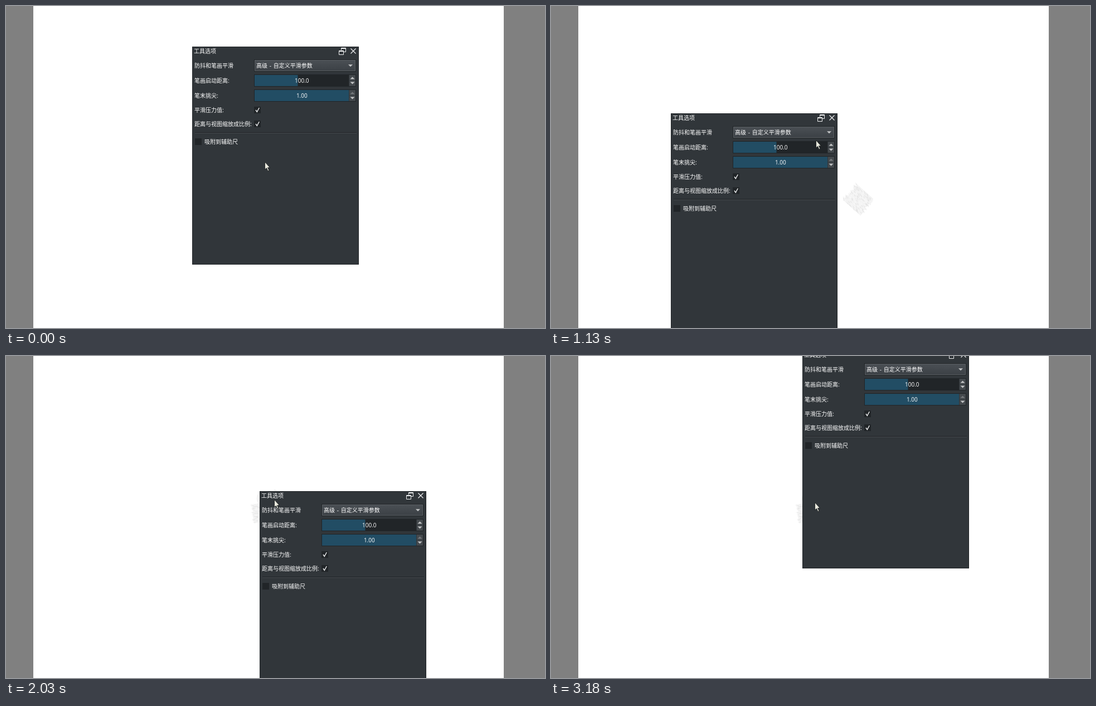
An HTML page with a canvas for the animation above (3.64 s loop, 967 by 579 pixels).

```html
<!DOCTYPE html>
<html lang="zh-CN">
<head>
<meta charset="utf-8">
<title>Tool options</title>
<style>
  html, body { margin: 0; width: 100%; height: 100%; overflow: hidden; background: #808080; }
  canvas, svg { position: absolute; left: 0; top: 0; display: block; }
  text {
    font: 10px "Open Sans", "Noto Sans CJK SC", "Noto Sans CJK", "Noto Sans", sans-serif;
    word-spacing: 1.2px;
    fill: #fff;
  }
</style>
</head>
<body>
<canvas id="paper" width="967" height="579"></canvas>
<svg id="stage" width="967" height="579" viewBox="0 0 967 579">
  <defs>
    <linearGradient id="raised" x1="0" y1="0" x2="0" y2="1">
      <stop offset="0" stop-color="#4b5055"/>
      <stop offset="1" stop-color="#3b4045"/>
    </linearGradient>
  </defs>
  <path id="wisp" d="M454 247Q447 256 454 265" fill="none" stroke="#000" stroke-opacity=".06" stroke-width="1.5"/>
  <g id="panel"></g>
  <g id="brush" fill="none" stroke="#000">
    <ellipse rx="31" ry="18"/>
    <circle r="2"/>
  </g>
  <path id="arrow" d="M.5 .5V14L3.5 11.3L5.9 16.7L7.9 15.8L5.6 10.6H9.5Z" fill="#ebebdf" stroke="#15181a" stroke-width=".8"/>
</svg>
<script>
const LOOP = 3640, STEP = 40;
const $ = id => document.getElementById(id);

// Panel parts, relative to its top left corner
const DARK = '#212528', EDGE = '#202427', LIGHT = '#eff0f1', DIM = '#75797c', MID = '#c4c6c7';

const box = (x, y, w, h, fill) =>
  `<rect x="${x}" y="${y}" width="${w}" height="${h}" fill="${fill}"/>`;
const frame = (x, y, w, h, color = EDGE) =>
  `<rect x="${x + .5}" y="${y + .5}" width="${w - 1}" height="${h - 1}" fill="none" stroke="${color}"/>`;
const label = (x, mid, str, anchor = 'start') =>
  `<text x="${x}" y="${mid + 3.7}" text-anchor="${anchor}">${str}</text>`;
const line = (d, color = LIGHT, width = 1) =>
  `<path d="${d}" fill="none" stroke="${color}" stroke-width="${width}"/>`;
const tri = (x, y, h, color) =>
  `<path d="M${x - 4} ${y - h / 2}h8l-4 ${h}z" fill="${color}"/>`;

function slider(mid, width, value, upColor) {
  const y = mid - 10;
  return box(112, y, 169, 20, DARK) +
    box(112, y, width, 20, '#224d64') +
    label(196.8, mid, value, 'middle') +
    box(282, y, 11, 20, '#44494d') +
    line(`M282 ${mid}h11`, '#33383c') +
    tri(287.5, mid - 4.5, -4, upColor) +
    tri(287.5, mid + 4.5, 4, MID) +
    frame(111, y - 1, 183, 22);
}

function combo(mid, str) {
  return box(112, mid - 10, 181, 20, 'url(#raised)') +
    frame(112, mid - 10, 181, 20, '#5a5f63') +
    frame(111, mid - 11, 183, 22) +
    label(115, mid, str) + tri(284, mid + .3, 4, MID);
}

function check(x, mid, on) {
  return box(x, mid - 6, 12, 12, DARK) +
    (on ? line(`M${x + 3} ${mid}l2.3 3.4l4 -7.4`, LIGHT, 1.4) : '');
}

$('panel').innerHTML =
  box(0, 0, 299, 392, '#31363a') + frame(0, 0, 299, 392) +
  label(3, 8, '工具选项') +
  line('M267.5 6.5V2.5H275.5V9.5H271.5M267.5 3.5H275.5M263.5 7.5H271.5V14.5H263.5ZM263.5 8.5H271.5') +
  line('M284.5 3.5l9 9m0 -9l-9 9', LIGHT, 1.2) +
  label(4, 34, '防抖和笔画平滑') + combo(34, '高级 - 自定义平滑参数') +
  label(4, 61, '笔画启动距离:') + slider(61, 77.5, '100.0', MID) +
  label(4, 88, '笔末挑尖:') + slider(88, 169, '1.00', DIM) +
  label(4, 114.5, '平滑压力值:') + check(111, 114, true) +
  label(4, 139.5, '距离与视图缩放成比例:') + check(111, 139, true) +
  line('M5 154.5H295', '#1e2124') + line('M5 155.5H295', '#474c50') +
  check(5, 171, false) + label(22, 171, '吸附到辅助尺');

// Paper with faint bristle marks
const ctx = $('paper').getContext('2d');
let seed = 7;
const rnd = () => (seed = seed * 16807 % 2147483647) / 2147483647;

function smudge(cx, cy, w, h, degrees) {
  ctx.save();
  ctx.translate(cx, cy);
  ctx.rotate(degrees * Math.PI / 180);
  for (let y = -h / 2; y < h / 2; y += 2) {
    const left = -w / 2 + rnd() * 4, right = w / 2 - rnd() * 4;
    ctx.fillStyle = 'rgba(0,0,0,.05)';
    ctx.fillRect(left, y, right - left, 2);
    for (let x = left; x < right; x += 3 + rnd() * 4) {
      ctx.fillStyle = rnd() < .5 ? 'rgba(0,0,0,.035)' : 'rgba(255,255,255,.3)';
      ctx.beginPath();
      ctx.ellipse(x, y + rnd() * 2, 2.5, 1, .3, 0, 7);
      ctx.fill();
    }
  }
  ctx.restore();
}

ctx.fillStyle = '#808080';
ctx.fillRect(0, 0, 967, 579);
ctx.fillStyle = '#fff';
ctx.fillRect(49, 0, 844, 579);
smudge(552, 348, 45, 37, 42);
smudge(488, 266, 42, 40, 30);
smudge(467, 280, 52, 34, -9);

// While the panel is open the pointer goes from one point to another;
// once it hides, the brush glides to where the panel opens next.
const visits = [
  { open: 0, leave: 320, hide: 740, from: [464, 280], to: [594, 121], tilt: -47 },
  { open: 1130, leave: 1370, hide: 1680, from: [475, 241], to: [241, 208], tilt: 8 },
  { open: 2030, leave: 2490, hide: 2780, from: [481, 258], to: [477, 516], tilt: 80 },
  { open: 3180, leave: LOOP, hide: LOOP, from: [473, 263], to: [473, 263], tilt: 0 }
];
const SETTLE = 70, REST = 100;

// The panel reopens with the pointer over the spot it left
visits.forEach((v, i) => {
  const last = visits[i - 1];
  v.panel = last ? last.panel.map((p, k) => p + v.from[k] - last.to[k]) : [334, 73];
});

const smooth = p => p * p * (3 - 2 * p);
const easeOut = p => 1 - (1 - p) ** 3;

function glide(a, b, t, start, end, ease) {
  const passed = Math.floor(Math.max(0, t - start) / STEP) * STEP;
  const e = ease(Math.min(1, passed / (end - start)));
  return a.map((v, k) => v + (b[k] - v) * e);
}

const show = (el, on) => el.setAttribute('visibility', on ? 'visible' : 'hidden');
const place = (el, [x, y], turn = 0) =>
  el.setAttribute('transform', `translate(${x} ${y}) rotate(${turn})`);

function draw(t) {
  const i = visits.findLastIndex(v => v.open <= t);
  const v = visits[i], open = t < v.hide;
  show($('panel'), open);
  show($('arrow'), open);
  show($('brush'), !open);
  show($('wisp'), t >= 1910);
  if (open) {
    const at = t < v.leave ? v.from : glide(v.from, v.to, t, v.leave, v.hide - SETTLE, smooth);
    place($('panel'), v.panel);
    place($('arrow'), at.map(Math.round));
  } else {
    const next = visits[i + 1];
    place($('brush'), glide(v.to, next.from, t, v.hide + REST, next.open, easeOut), v.tilt);
  }
}

const start = performance.now();
function tick() {
  draw((performance.now() - start) % LOOP);
  requestAnimationFrame(tick);
}
tick();
</script>
</body>
</html>
```
